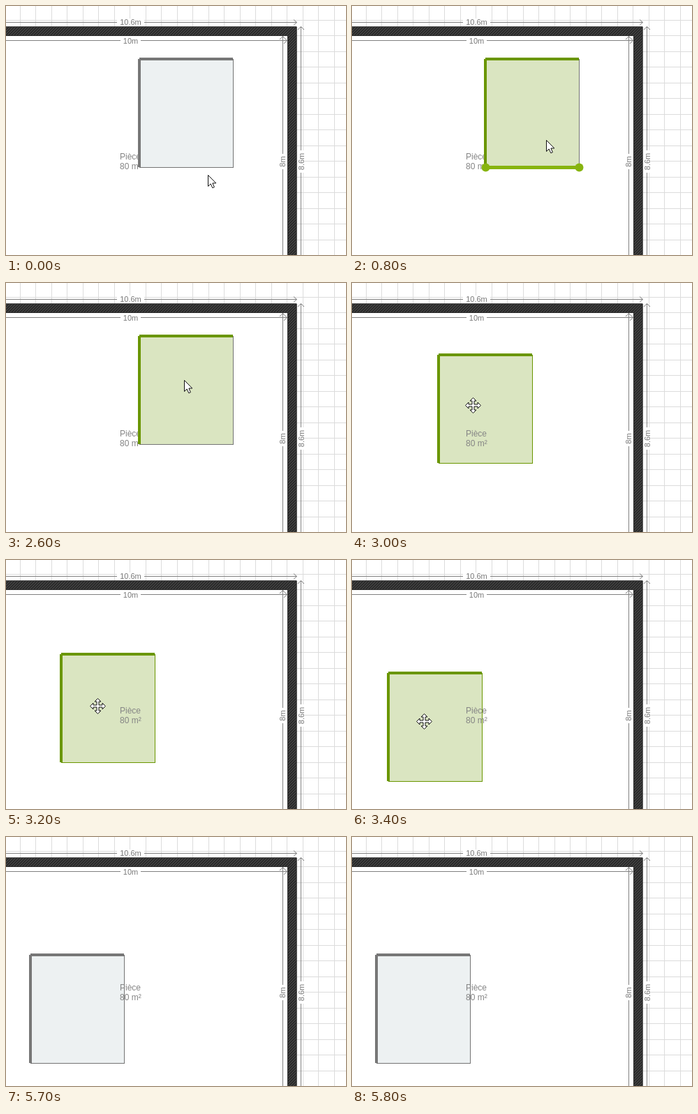
Write an HTML page that moves like this. It is 487 by 357 pixels and loops after 6500 ms.

```html
<!DOCTYPE html>
<html lang="fr">
<head>
<meta charset="utf-8">
<title>Plan</title>
<style>
  html, body { margin: 0; width: 100%; height: 100%; overflow: hidden; background: #fff; }
  svg { display: block; }
  text { font-family: "Liberation Sans", Arial, sans-serif; fill: #858585; }
  .dim text { font-size: 11px; text-anchor: middle; fill: #777; }
  .dim path { fill: none; stroke: #808080; }
  .dim rect { fill: #fff; }
  .pointer { fill: #fff; stroke: #111; }
</style>
</head>
<body>
<svg width="487" height="357" viewBox="0 0 487 357">
  <defs>
    <pattern id="hatch" width="4" height="4" patternUnits="userSpaceOnUse">
      <rect width="4" height="4" fill="#2b2b2b"/>
      <path d="M-1 1L1 -1M0 4L4 0M3 5L5 3" stroke="#606060" stroke-width=".7"/>
    </pattern>
  </defs>

  <path id="grid" stroke="#dcdcdc"/>
  <rect y="30" width="416" height="327" fill="#fff"/>
  <path d="M0 29.5H416.5V357H403V43H0Z" fill="url(#hatch)"/>
  <path d="M0 30H416V357M0 42.5H403.5V357" fill="none" stroke="#2b2b2b"/>

  <g class="dim">
    <path d="M0 23.5H416M412 19.5L416.5 23.5L412 27.5"/>
    <rect x="159" y="18" width="39" height="11"/>
    <text x="178.5" y="27">10.6m</text>
    <path d="M0 49.5H402M398 45L402.5 49.5L398 54"/>
    <rect x="164" y="44" width="29" height="12"/>
    <text x="178.5" y="54">10m</text>
    <path d="M396.5 357V43M392 48L396.5 43.5L401 48"/>
    <rect x="391" y="212" width="11" height="22"/>
    <text transform="translate(400 223) rotate(-90)">8m</text>
    <path d="M422.5 357V30M418 34L422.5 29.5L427 34"/>
    <rect x="417" y="207" width="11" height="32"/>
    <text transform="translate(427 223) rotate(-90)">8.6m</text>
  </g>

  <g id="label" font-size="12">
    <text x="163" y="220">Pièce</text>
    <text x="163" y="234">80 m²</text>
  </g>

  <g id="room">
    <rect id="edge" x="191.5" y="76.5" width="134" height="155"/>
    <path id="walls" d="M191 76V231M191 76H325" fill="none" stroke-width="4"/>
    <g id="selected" fill="#87b40f">
      <rect x="191" y="229" width="134" height="5"/>
      <circle cx="191.5" cy="231.5" r="6"/>
      <circle cx="325.5" cy="231.5" r="6"/>
    </g>
  </g>

  <path id="arrow" class="pointer" d="M.5 .5V16.5L4.2 13L6.8 18.8L9.4 17.7L6.9 12H11.8Z"/>
  <path id="move" class="pointer"/>
</svg>
<script>
const LOOP = 6500, STEP = 100;
const $ = id => document.getElementById(id);
const [grid, label, room, edge, walls, selected, arrow, move] =
  ['grid', 'label', 'room', 'edge', 'walls', 'selected', 'arrow', 'move'].map($);

// [time, x, y]
const pointerPath = [
  [600, 289, 242], [700, 284, 222], [800, 278, 192], [900, 271, 174],
  [1100, 262, 153], [1200, 262, 153], [1300, 259, 148], [1500, 255, 139],
  [2600, 255, 139], [2700, 246, 142], [3000, 173, 175], [3200, 131, 209],
  [3400, 103, 231], [3500, 100, 232]
];
const roomPath = [
  [2600, 0, 0], [2700, -3, 1], [3000, -67, 27], [3200, -112, 59],
  [3400, -139, 86], [3600, -156, 93]
];

function along(path, t) {
  const i = path.findIndex(p => p[0] >= t);
  if (i < 0) return path[path.length - 1].slice(1);
  if (i === 0) return path[0].slice(1);
  const a = path[i - 1], b = path[i], k = (t - a[0]) / (b[0] - a[0]);
  return [1, 2].map(n => Math.round(a[n] + (b[n] - a[n]) * k));
}

const place = (el, [x, y]) => el.setAttribute('transform', `translate(${x} ${y})`);
const show = (el, on) => el.setAttribute('visibility', on ? 'visible' : 'hidden');

let lines = '';
for (let p = 20; p < 487; p += 22.5) {
  const c = Math.floor(p) + .5;
  lines += `M${c} 0V357M0 ${c}H487`;
}
grid.setAttribute('d', lines);

// One arm of the four-way pointer, turned a quarter at a time
const arm = [[-1.5, -1.5], [-1.5, -6.5], [-4.5, -6.5], [0, -11], [4.5, -6.5], [1.5, -6.5]];
const turn = ([x, y], n) => n ? turn([-y, x], n - 1) : [x, y];
move.setAttribute('d', 'M' + [0, 1, 2, 3].flatMap(n => arm.map(p => turn(p, n))).join('L') + 'Z');

function draw(now) {
  const t = Math.floor(now % LOOP / STEP) * STEP;
  const hover = t >= 700 && t < 5700;
  const dragging = t >= 2700 && t < 4500;
  const main = hover ? '#6a9600' : '#777';

  edge.setAttribute('fill', hover ? '#dae5c1' : '#edf1f2');
  edge.setAttribute('stroke', dragging ? main : hover && t >= 4500 ? '#6e8630' : '#747474');
  walls.setAttribute('stroke', main);
  show(selected, t === 700 || t === 800);
  place(room, along(roomPath, t));
  if (t < 2700) label.after(room);
  else label.before(room);

  const at = along(pointerPath, t);
  place(arrow, at);
  place(move, [at[0] + .5, at[1] + .5]);
  show(arrow, t < 5700 && !dragging);
  show(move, dragging);
  requestAnimationFrame(draw);
}
const start = performance.now();
(function frame() {
  draw(0);
})();
</script>
</body>
</html>
```
